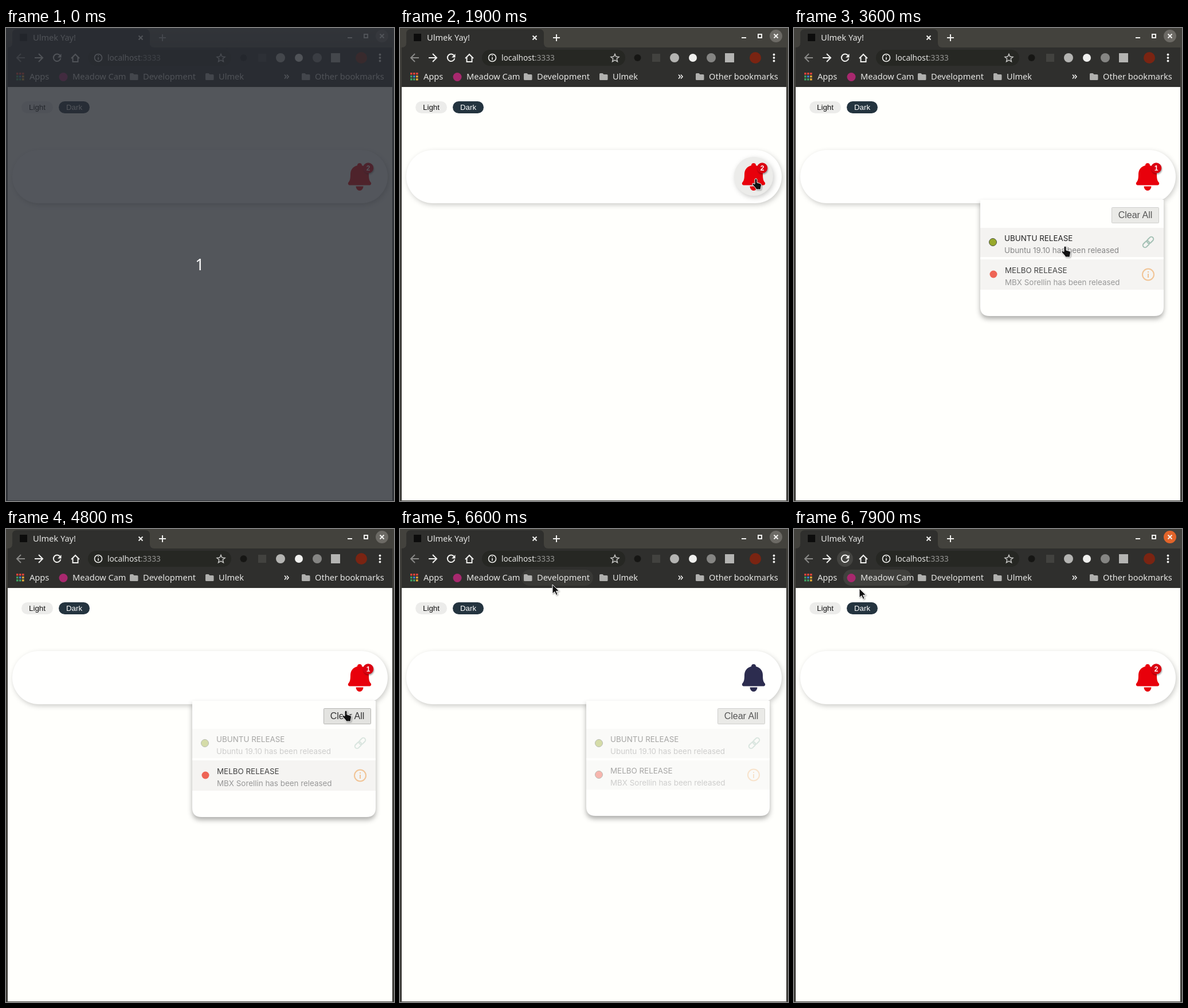
Animation of 677 by 826 pixels, one loop 8 s. Source, as an HTML page:

```html
<!DOCTYPE html>
<html lang="en">
<head>
<meta charset="utf-8">
<title>Notification bell</title>
<style>
  html, body { margin: 0; width: 100%; height: 100%; overflow: hidden; background: #3f3e3a; }
  svg { display: block; }
  text { font: 14.6px "Noto Sans", sans-serif; fill: #e6e6e4; }
  .url { font-size: 13.7px; }
  .pill { font: 13.33px "Liberation Sans", Arial, sans-serif; text-anchor: middle; }
  .clear { font: 16px "Liberation Sans", Arial, sans-serif; text-anchor: middle; }
  .item text { font: 13.4px Inter, sans-serif; fill: #222; }
  .item .sub { fill: #868686; }
  .line { fill: none; stroke: #f0f0ee; stroke-width: 2; }
  .soft { filter: drop-shadow(2px 3px 4px rgba(0, 0, 0, .2)); }
  .drop { filter: drop-shadow(0 5px 4px rgba(0, 0, 0, .32)); }
  .badge { filter: drop-shadow(1px 2px 1px rgba(0, 0, 0, .35)); }
  #count { font: bold 12px "Liberation Sans", Arial, sans-serif; fill: #fff; text-anchor: middle; }
  #cursor { fill: #111; stroke: #fff; filter: drop-shadow(1px 1px 1px rgba(0, 0, 0, .4)); }
</style>
</head>
<body>
<svg width="677" height="826" viewBox="0 0 677 826">
  <defs>
    <linearGradient id="bar" x2="0" y2="1">
      <stop offset="0" stop-color="#56554f"/><stop offset="1" stop-color="#4b4a45"/>
    </linearGradient>
    <path id="folder" d="M0 80.5q0-1.5 1.5-1.5h4l2 2h5.500q1.500 0 1.500 1.500v7q0 1.500-1.500 1.500h-11.500q-1.500 0-1.500-1.500z" fill="#b0b0ae"/>
  </defs>

  <!-- window frame and tab -->
  <rect id="frame" width="677" height="826"/>
  <rect id="titlebar" width="677" height="34"/>
  <path d="M3 34q8 0 8-8v-16q0-8 8-8h224q8 0 8 8v16q0 8 8 8h415v69h-671z" fill="#2f2f2d"/>
  <rect x="24" y="10" width="13" height="13" fill="#0c0c0c"/>
  <text x="47" y="22">Ulmek Yay!</text>
  <path class="line" stroke-width="1.600" d="M231.500 13.500l7 7m0-7l-7 7"/>
  <path id="plus" class="line" d="M267 17h12m-6-6v12"/>
  <path class="line" d="M596 17h8M625 11h6v6h-6z"/>
  <circle id="close" cx="656" cy="14" r="11"/>
  <path class="line" d="M652.500 10.500l7 7m0-7l-7 7"/>

  <!-- toolbar -->
  <circle id="reload" cx="89" cy="52" r="14" fill="#444441"/>
  <path class="line" style="stroke:#898987" d="M33 52h-14m7-7l-7 7 7 7"/>
  <path class="line" d="M50 52h14m-7-7l7 7-7 7M94.500 48.500a6.300 6.300 0 1 0 .8 4.500M114 53l7-7 7 7m-11.500-2v8h9v-8"/>
  <path d="M96.500 45v6.500h-6.500z" fill="#f0f0ee"/>
  <rect x="143" y="38" width="250" height="28" rx="14" fill="#262723"/>
  <g class="line" style="stroke-width:1.600"><circle cx="161" cy="52" r="6.500"/><path d="M161 51v4.500m0-8v1.600"/></g>
  <text class="url" x="177" y="57">localhost<tspan fill="#969694">:3333</tspan></text>
  <path class="line" style="stroke:#c4c4c2;stroke-width:1.500" d="M375 45.500l2 4.600 5 .4-3.800 3.300 1.200 4.900-4.400-2.600-4.400 2.600 1.200-4.900-3.800-3.300 5-.4z"/>
  <circle cx="414.500" cy="52" r="6" fill="#161614"/>
  <rect x="440" y="45" width="14" height="14" fill="#42423f"/>
  <circle cx="479" cy="52" r="8" fill="#b4b4b2"/>
  <circle cx="511" cy="52" r="7" fill="#f0f0ee"/>
  <circle cx="543" cy="52" r="8" fill="#858583"/>
  <rect x="567" y="44" width="16" height="16" fill="#b4b4b2"/>
  <circle cx="620" cy="52" r="10" fill="#7a2412"/>
  <g fill="#f0f0ee"><circle cx="652.500" cy="46.500" r="1.900"/><circle cx="652.500" cy="52" r="1.900"/><circle cx="652.500" cy="57.500" r="1.900"/></g>

  <!-- bookmarks -->
  <rect id="hoverCam" x="86" y="71" width="119" height="28" rx="14" fill="#40403d"/>
  <rect id="hoverDev" x="212" y="71" width="125" height="28" rx="14" fill="#393936"/>
  <g id="apps"></g>
  <circle cx="100" cy="85.500" r="7.500" fill="#a8286e"/>
  <use href="#folder" x="216"/><use href="#folder" x="348"/><use href="#folder" x="516"/>
  <text x="41" y="90">Apps</text>
  <text x="116" y="90">Meadow Cam</text>
  <text x="239" y="90">Development</text>
  <text x="371" y="90">Ulmek</text>
  <path class="line" style="stroke-width:1.600" d="M486 81.500l3 3.500-3 3.500m4-7l3 3.500-3 3.500"/>
  <text x="539" y="90">Other bookmarks</text>

  <!-- page -->
  <path d="M3 103h671v722h-671z" fill="#fffffc"/>
  <rect x="27" y="128" width="55" height="21" rx="10.500" fill="#ececea"/>
  <text class="pill" x="54.500" y="143" style="fill:#111">Light</text>
  <rect x="92" y="128" width="54" height="21" rx="10.500" fill="#24343f"/>
  <text class="pill" x="119" y="143" style="fill:#fff">Dark</text>
  <rect class="soft" x="11" y="213" width="655" height="93" rx="46.500" fill="#fffffe"/>

  <g id="panel">
    <path id="sheet" class="drop" fill="#fffffd"/>
    <rect id="clear" x="554.500" y="313.500" width="82" height="27" rx="1"/>
    <text id="clearText" class="clear" x="595.500" y="332">Clear All</text>
    <g id="item0" class="item">
      <rect width="320" fill="#f4f3f1"/>
      <g>
        <circle cx="22" cy="25" r="6.500" fill="#98a92b"/>
        <text x="42" y="23">UBUNTU RELEASE</text>
        <text x="42" y="44" class="sub">Ubuntu 19.10 has been released</text>
        <g class="line" style="stroke:#a3c0b4" transform="translate(293 25) rotate(-45)">
          <rect x="-11.500" y="-3.800" width="13" height="7.600" rx="3.800"/>
          <rect x="-1.500" y="-3.800" width="13" height="7.600" rx="3.800"/>
        </g>
      </g>
    </g>
    <g id="item1" class="item">
      <rect width="320" fill="#f4f3f1"/>
      <g>
        <circle cx="22" cy="25" r="6.500" fill="#ec4b3a"/>
        <text x="42" y="23">MELBO RELEASE</text>
        <text x="42" y="44" class="sub">MBX Sorellin has been released</text>
        <g class="line" style="stroke:#efba84"><circle cx="292" cy="25.500" r="10"/><path d="M292 24v7m0-11v2"/></g>
      </g>
    </g>
  </g>

  <circle id="halo" class="soft" cx="617" cy="259" r="34" fill="#ececea"/>
  <path id="bell" d="M617 236a4 4 0 0 1 4 4c8 2 12 8 12 15 0 9 1 11.500 3.500 14.500 1.500 2 .5 5-2 5h-35c-2.500 0-3.500-3-2-5 2.500-3 3.500-5.500 3.500-14.500 0-7 4-13 12-15a4 4 0 0 1 4-4zM610.500 276.500h13a6.500 7.500 0 0 1-13 0z"/>
  <g id="badge">
    <circle class="badge" cx="632" cy="244.500" r="9.300" fill="#db0012"/>
    <text id="count" x="632" y="249"></text>
  </g>
  <path id="cursor"/>

  <g id="countdown">
    <rect width="677" height="826" fill="#282c34" opacity=".8"/>
    <text x="338" y="423" text-anchor="middle" style="font-size:27px;fill:#fff">1</text>
  </g>
</svg>

<script>
const LOOP = 8000, STEP = 100;
const ARROW = "M0 0v16l3.800-3.500 2.700 6 2.600-1.200-2.600-5.800h5.200z";
const HAND = "M-2 1a2 2 0 0 1 4 0v5l5.500 1.500q2 .5 2 3l-1 5.500v2h-8l-1-2.500-5-5.500q-1.500-2 .5-3l3 1.500z";

// time, x and y of the pointer tip
const route = [
  [1300, 543, 73], [1700, 621, 264], [2400, 621, 264], [2900, 473, 382],
  [4100, 473, 382], [4200, 475, 384], [4300, 475, 384], [4800, 593, 318],
  [5800, 593, 318], [5900, 594, 314], [6100, 594, 314], [6400, 357, 144],
  [6500, 357, 144], [6600, 266, 97], [7400, 92, 53], [7700, 92, 53], [7900, 114, 104]
];

const $ = id => document.getElementById(id);
const set = (el, attrs) => { for (const key in attrs) el.setAttribute(key, attrs[key]); };
const show = (id, on) => set($(id), { opacity: +on });
const within = (v, from, to) => v >= from && v < to;

$("apps").innerHTML = ["#e0443a", "#e0443a", "#e0443a", "#3f9e62", "#3d7fd0", "#e0a93a", "#3f9e62", "#3f9e62", "#e0a93a"]
  .map((c, i) => `<rect x="${18 + i % 3 * 5}" y="${78 + Math.floor(i / 3) * 5}" width="3.500" height="3.500" fill="${c}"/>`).join("");

function pointerAt(t) {
  const next = route.findIndex(p => p[0] >= t);
  if (next < 1) return route[0].slice(1);
  const [t0, x0, y0] = route[next - 1], [t1, x1, y1] = route[next];
  const k = (t - t0) / (t1 - t0);
  return [x0 + (x1 - x0) * k, y0 + (y1 - y0) * k];
}

function drawItem(i, y, unread, opacity) {
  const item = $("item" + i), [back, content] = item.children;
  set(item, { transform: `translate(325 ${y})`, opacity });
  set(back, { height: 51 + 2 * unread });
  set(content, { transform: `translate(${unread} ${unread})` });
  set(content.children[0], { stroke: unread ? "none" : "#4c5548" });
}

function drawPanel(t) {
  const unread = [+(t < 3600), +(t < 5300)];
  const bottom = 501 + 2 * (unread[0] + unread[1]);
  set($("sheet"), { d: `M325 300h320V${bottom - 16}q0 16-16 16H341q-16 0-16-16z` });
  const fade = t < 2900 ? .85 : t < 3700 ? 1 : .4;
  drawItem(0, 349, unread[0], fade);
  drawItem(1, 404 + 2 * unread[0], unread[1], t < 5400 ? .85 : .4);
  const hover = within(t, 4700, 6200);
  set($("clear"), { fill: hover ? "#e3e3e0" : "#eaeae7", stroke: hover ? "#b4b4b1" : "#cfcfcc" });
  $("clearText").style.fill = hover ? "#333" : "#555";
}

function draw(now) {
  const t = Math.floor(now % LOOP / STEP) * STEP;
  const focused = t >= 1900, reloaded = t >= 7600, cleared = within(t, 5300, 7600);
  const [x, y] = pointerAt(t);

  set($("frame"), { fill: focused ? "#3f3e3a" : "#504f4a" });
  set($("titlebar"), { fill: focused ? "#43423d" : "url(#bar)" });
  $("plus").style.stroke = focused ? "#f0f0ee" : "#b2b2ae";
  set($("close"), { fill: t >= 7900 ? "#e2642a" : "#6c6a65" });

  const onBookmarks = t >= 6600 && within(y, 71, 106);
  show("hoverCam", onBookmarks && within(x, 86, 205));
  show("hoverDev", onBookmarks && within(x, 212, 337));
  show("reload", t >= 7500);

  show("panel", within(t, 2100, 7600));
  drawPanel(t);

  set($("halo"), { opacity: within(t, 1700, 2500) ? 1 : t === 1600 || t === 2500 ? .5 : 0 });
  set($("bell"), { fill: cleared ? "#2c2c4f" : "#e8000b" });
  show("badge", !cleared);
  $("count").textContent = t < 3600 || reloaded ? 2 : 1;

  show("cursor", t >= 1300);
  set($("cursor"), { d: within(t, 1600, 6200) ? HAND : ARROW, transform: `translate(${x} ${y})` });
  show("countdown", t < 400);
}

function tick() {
  draw(performance.now());
  requestAnimationFrame(tick);
}
tick();
</script>
</body>
</html>
```
